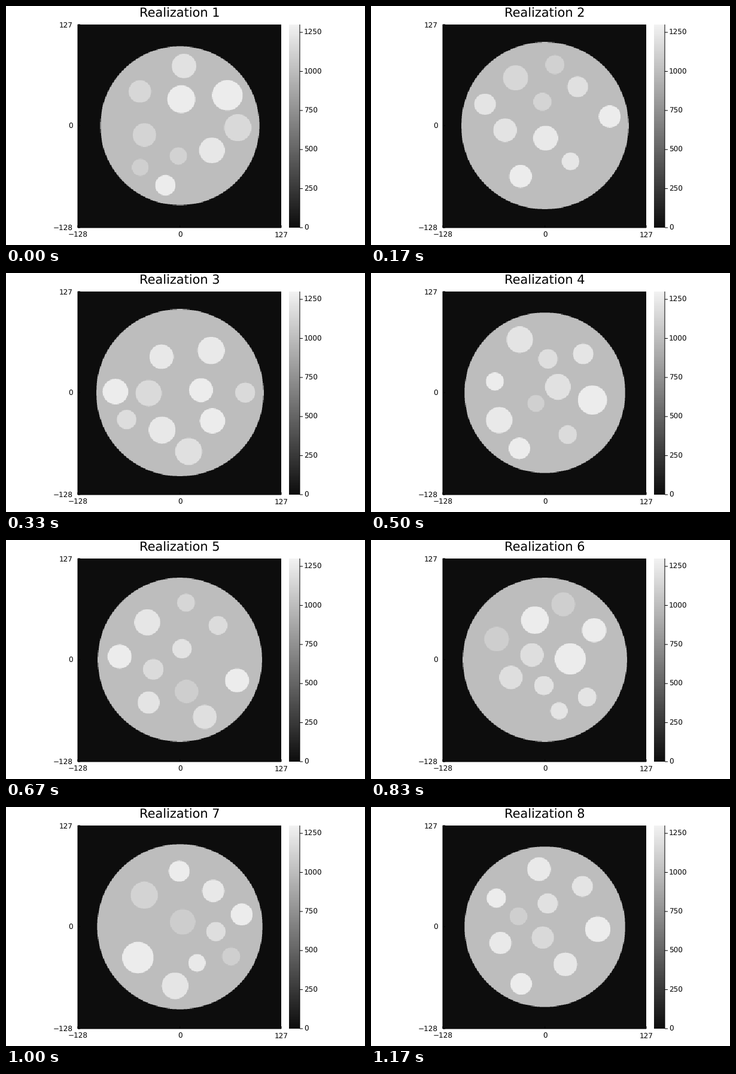
Recreate the animation shown at these times as a matplotlib script. Size 600 by 400 pixels, loop 1340 ms.

```python
import random
import numpy as np
import matplotlib.pyplot as plt
from matplotlib.animation import FuncAnimation
from matplotlib.colors import LinearSegmentedColormap

W, H, DPI = 600, 400, 100
PX = 72 / DPI
LEFT, RIGHT, TOP, BOTTOM = 120, 460, 31, 371
CELLS, FINE = 256, 3
STEP = (RIGHT - LEFT) / CELLS
CX, CY = LEFT + (CELLS + 1) / 2 * STEP, BOTTOM - (CELLS + 1) / 2 * STEP
BODY, BRIGHT, PEAK = 1000, 1265, 1300

plt.rcParams["font.family"] = "DejaVu Sans"
plt.rcParams["text.hinting"] = "none"
GRAYS = LinearSegmentedColormap.from_list("soft_grays", ["#0d0d0d", "#f2f2f2"])

sub = (np.arange(CELLS * FINE) + 0.5) * STEP / FINE
grid_x = (LEFT + sub)[None, :]
grid_y = (BOTTOM - sub)[:, None]

# Disk radius in cells, then the brightest blobs (x, y, r) in pixels.
SCENES = [
    (100.1, (370, 149.5, 25.5), (293, 156, 23.3), (266.5, 300, 17)),
    (105.4, (399, 185, 18.5), (250, 285, 19)),
    (105.4, (183, 198.5, 21.2), (345, 247.5, 21.2), (326, 196, 20)),
    (101.2, (370, 212.5, 24.3), (248, 293.5, 18), (207, 181.5, 15)),
    (103.4, (190, 195, 20), (386, 235, 20)),
    (103.4, (274, 134, 23), (333, 199, 26), (373, 151, 20.3)),
    (104.1, (220.5, 252, 26.3), (394, 180, 18.3), (289.5, 107.5, 17.5)),
    (101.2, (379, 204.5, 21.3), (209.5, 152.5, 16), (251, 296, 18)),
]


def coverage(x, y, r):
    """Share of every cell that lies inside a circle."""
    inside = (grid_x - x) ** 2 + (grid_y - y) ** 2 <= r * r
    return inside.reshape(CELLS, FINE, CELLS, FINE).mean(axis=(1, 3))


def clearance(blob, blobs, rim):
    """Smallest gap from a blob to the others and to the rim of the disk."""
    x, y, r = blob
    gaps = [np.hypot(x - bx, y - by) - r - br for bx, by, br in blobs]
    return min(gaps + [rim - np.hypot(x - CX, y - CY) - r])


def phantom(seed, cells, *blobs, count=10, tries=150):
    """Disk with ten blobs; the missing ones go where there is most room."""
    rng = random.Random(seed)
    rim = cells * STEP
    blobs = list(blobs)
    values = [BRIGHT] * len(blobs)
    while len(blobs) < count:
        r = rng.uniform(14, 23)
        spots = [(CX + rng.uniform(-rim, rim), CY + rng.uniform(-rim, rim), r)
                 for _ in range(tries)]
        blobs.append(max(spots, key=lambda s: clearance(s, blobs, rim)))
        values.append(rng.uniform(1090, 1250))
    img = BODY * coverage(CX, CY, rim)
    for blob, value in zip(blobs, values):
        img += (value - BODY) * coverage(*blob)
    return img


images = [phantom(seed, *scene) for seed, scene in enumerate(SCENES)]

fig = plt.figure(figsize=(W / DPI, H / DPI), dpi=DPI, facecolor="white")
ax = fig.add_axes([0, 0, 1, 1])
ax.axis("off")


def line(xs, ys):
    ax.plot(xs, ys, color="black", lw=PX, solid_capstyle="butt", snap=False)


def label(x, y, text, ha, size=12):
    return ax.text(x, y, text, ha=ha, va="baseline", fontsize=size * PX)


def show(data, x0, x1):
    return ax.imshow(data, cmap=GRAYS, vmin=0, vmax=PEAK, origin="lower",
                     interpolation="nearest", aspect="auto",
                     extent=(x0, x1, BOTTOM, TOP))


picture = show(images[0], LEFT, RIGHT)
show(np.linspace(0, PEAK, 256)[:, None], 473, 491)

line([LEFT] * 2, [TOP, BOTTOM])
line([LEFT, RIGHT], [BOTTOM] * 2)
line([491] * 2, [TOP, BOTTOM])

for value in range(0, PEAK, 250):
    y = BOTTOM - value / PEAK * (BOTTOM - TOP)
    line([491, 496], [y, y])
    label(498, y + 4, str(value), "left")

for text, x, y in [("\u2212128", LEFT, BOTTOM), ("0", CX, CY), ("127", RIGHT, TOP)]:
    line([x, x], [BOTTOM, BOTTOM - 4])
    line([LEFT, LEFT + 4], [y, y])
    label(x, 387, text, "center")
    label(112, y + 4.8, text, "right")

title = label(290.5, 19, "", "center", size=20.9)
ax.set_xlim(0, W)
ax.set_ylim(H, 0)


def update(step):
    n = min(len(images) - 1, int((step + 0.5) * 0.06))
    picture.set_data(images[n])
    title.set_text(f"Realization {n + 1}")
    return picture, title


anim = FuncAnimation(fig, update, frames=134, interval=10, repeat=True,
                     repeat_delay=0, blit=False)
plt.show()
```
